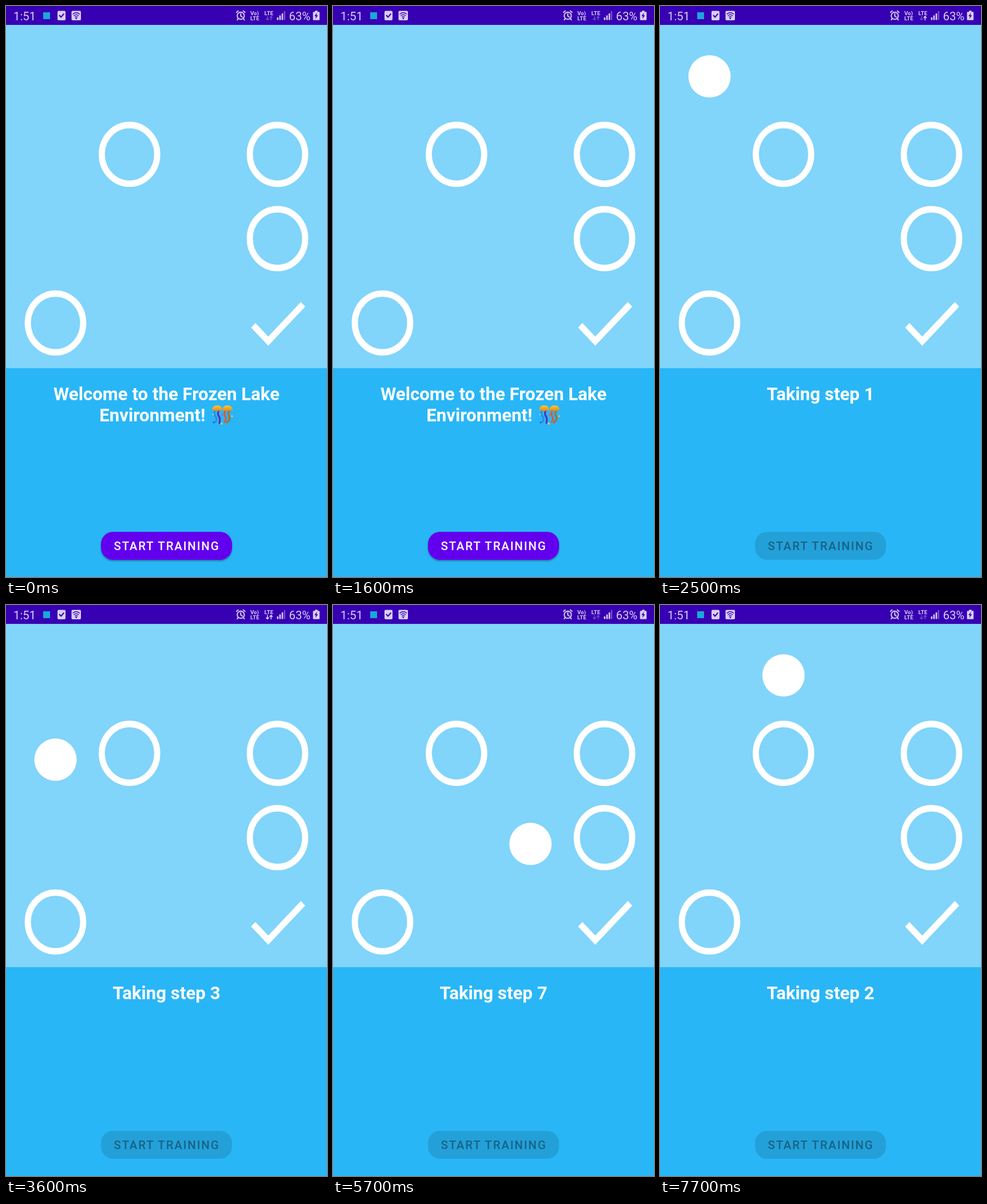
An HTML page that plays this animation: 561x998 px, repeating every 8000 ms.

```html
<!DOCTYPE html>
<html lang="en">
<head>
<meta charset="utf-8">
<title>Frozen Lake</title>
<style>
  html, body { margin: 0; width: 100%; height: 100%; overflow: hidden; background: #29b6f6; }
  svg { display: block; font-family: Roboto, sans-serif; }
  .title { font-size: 31.2px; font-weight: 700; fill: #fff; }
  .label { font-size: 20.5px; font-weight: 500; letter-spacing: .0893em; fill: #fff; }
  .status { fill: #d8cff1; font-size: 20.3px; }
  .tiny { font-size: 9.6px; font-weight: 700; }
  .off .face { fill: #000; fill-opacity: .12; filter: none; }
  .off .label { fill: #000; fill-opacity: .38; }
  .line { fill: none; stroke-linecap: round; stroke-linejoin: round; }
</style>
</head>
<body>
<svg width="561" height="998" viewBox="0 0 561 998">
  <defs>
    <filter id="shadow" x="-10%" y="-30%" width="120%" height="170%">
      <feDropShadow dx="0" dy="2" stdDeviation="1.6" flood-opacity=".35"/>
    </filter>
    <clipPath id="pill"><rect x="166" y="919" width="229" height="49" rx="21"/></clipPath>
    <radialGradient id="skin" cx=".45" cy=".35" r=".65">
      <stop offset=".3" stop-color="#ffd95a"/><stop offset="1" stop-color="#eda31f"/>
    </radialGradient>
    <linearGradient id="gold" x2="0" y2="1">
      <stop stop-color="#ffc73a"/><stop offset="1" stop-color="#d98a1b"/>
    </linearGradient>
  </defs>

  <rect width="561" height="633" fill="#81d4fa"/>
  <rect y="633" width="561" height="365" fill="#29b6f6"/>

  <!-- status bar -->
  <rect width="561" height="33" fill="#3700b3"/>
  <g class="status">
    <text x="13" y="24.5">1:51</text>
    <rect x="65" y="11" width="12" height="12" fill="#1da6dc"/>
    <rect x="90" y="8.5" width="14" height="16.5" rx="2"/>
    <path class="line" d="M93.5 16.5l2.6 3 4.8-5.5" stroke="#3700b3" stroke-width="2"/>
    <rect x="114.5" y="8.5" width="16.5" height="16.5" rx="2"/>
    <g class="line" stroke="#3700b3" stroke-width="1.4">
      <path d="M117 14q5.8-4.6 11.6 0M118.9 16.7q3.9-3 7.8 0M120.8 19.3q2-1.5 4 0"/>
    </g>
    <circle cx="122.8" cy="21.8" r="1.4" fill="#3700b3"/>
    <g class="line" stroke="#d8cff1" stroke-width="2">
      <circle cx="410.3" cy="17" r="6.2"/>
      <path d="M410.3 13.5v4l2.7 1.8M402.8 11.2l3-2.6M417.8 11.2l-3-2.6M405.5 22.5l-1.3 1.6M415.1 22.5l1.3 1.6"/>
    </g>
    <g class="tiny">
      <text x="427" y="15.5">Vo)</text>
      <text x="427" y="25">LTE</text>
      <text x="451.5" y="15.5">LTE</text>
    </g>
    <g class="line" stroke="#e6e0f6" stroke-width="1.5">
      <path id="down" d="M457 18v6.5m-2.2-2.3l2.2 2.3 2.2-2.3"/>
      <path id="up" d="M463.3 24.5v-6.5m-2.2 2.3l2.2-2.3 2.2 2.3"/>
    </g>
    <path d="M473.5 20h2.6v4.5h-2.6zM477.6 16.5h2.6v8h-2.6zM481.7 13h2.6v11.5h-2.6z"/>
    <path d="M485.6 9h2.4v15.5h-2.4z" opacity=".4"/>
    <text x="494.5" y="24.5">63%</text>
    <path d="M540 8.3h4.5v2h2.5q1 0 1 1v12.5q0 1-1 1h-9.5q-1 0-1-1v-12.5q0-1 1-1h2.5z"/>
    <path d="M543.6 11.5l-4.6 6.2h2.8l-1.4 5 5-6.5h-2.9z" fill="#3700b3"/>
  </g>

  <g id="lake" fill="none" stroke="#fff" stroke-width="2"></g>
  <circle id="agent" r="37" fill="#fff"/>

  <!-- messages -->
  <g id="welcome">
    <text class="title" x="280.5" y="689" text-anchor="middle">Welcome to the Frozen Lake</text>
    <text class="title" x="163.2" y="726">Environment!</text>
    <g class="line" stroke-width="3">
      <path d="M366 706q-4 6 0 11t0 10" stroke="#2c8be0"/>
      <path d="M372 706q-3 7 0 11t1 12" stroke="#5a2bb5"/>
      <path d="M384 706q-4 6-1 11t-1 10" stroke="#e4572a"/>
      <path d="M391 706q-4 6-1 11t-4 11" stroke="#b8672c"/>
    </g>
    <path d="M360 706q1-8 9-8t9 8q-9 4-18 0zM378 706q1-8 9-8t9 8q-9 4-18 0z" fill="url(#gold)"/>
    <g fill="#ffce3d">
      <circle cx="377" cy="730" r="1.7"/><circle cx="395" cy="717" r="1.4"/>
      <circle cx="362" cy="714" r="1.3" fill="#8de2ff"/><circle cx="378" cy="715" r="1.4" fill="#e8467c"/>
      <circle cx="363" cy="728" r="1.4" fill="#4a38c8"/><circle cx="393" cy="726" r="1.4" fill="#38a9d6"/>
    </g>
  </g>
  <text id="step" class="title" x="280.5" y="689" text-anchor="middle"></text>
  <g id="ended">
    <text class="title" x="115.8" y="689">Episode Terminated</text>
    <circle cx="427.3" cy="678.3" r="17" fill="url(#skin)"/>
    <g class="line" stroke="#6b4310" stroke-width="1.6">
      <path d="M416.5 677q3.5 3 7 0M431 677q3.5 3 7 0M422 686q5.3 4 10.6 0"/>
      <path d="M416 671q2.5-3 6-3M432.6 668q3.5 0 6 3" stroke-width="1.2"/>
    </g>
  </g>

  <g id="button">
    <rect class="face" x="166" y="919" width="229" height="49" rx="21" fill="#6200ee" filter="url(#shadow)"/>
    <circle id="ripple" cx="280" cy="944" fill="#fff" fill-opacity=".24" clip-path="url(#pill)"/>
    <text class="label" x="281" y="951.3" text-anchor="middle">START TRAINING</text>
  </g>

  <g id="touch">
    <circle r="18" fill="#bfe8ff" fill-opacity=".25"/>
    <circle r="14.5" fill="#d5effc" fill-opacity=".75" stroke="#6cc4ee" stroke-width="1"/>
  </g>
</svg>
<script>
const $ = id => document.getElementById(id);
const show = (id, on) => $(id).style.display = on ? '' : 'none';
const cellX = col => 86.5 + 129.33 * col;
const cellY = row => 112 + 147.3 * row;

// 24-unit icons stretched to a grid cell
const icon = (col, row, shape) =>
  `<g transform="translate(${cellX(col)} ${cellY(row)}) scale(5.38 5.7) translate(-12 -12)">${shape}</g>`;
const hole = '<circle cx="12" cy="12" r="9"/>';
const goal = '<path d="M9 16.17 4.83 12l-1.42 1.41L9 19 21 7l-1.41-1.41z" fill="#fff" stroke="none"/>';
$('lake').innerHTML = [[1, 1], [3, 1], [3, 2], [0, 3]].map(([c, r]) => icon(c, r, hole)).join('') + icon(3, 3, goal);

// start time, step number (0 = episode over), column, row
const steps = [
  [2400, 1, 0, 0], [3200, 2, 0, 0], [3600, 3, 0, 1], [4100, 4, 0, 2], [4600, 5, 0, 2],
  [5200, 6, 1, 2], [5700, 7, 2, 2], [6200, 0, 3, 2], [7200, 1, 0, 0], [7700, 2, 1, 0]
];

function drawTouch(t) {
  const drag = t >= 800 && t < 1600, tap = t >= 2100 && t < 2400;
  show('touch', drag || tap);
  const p = Math.min(1, Math.max(0, (t - 800) / 700));
  const k = p * p * (3 - 2 * p);
  const [x, y] = tap ? [280, 944] : [159 + 121 * k, 727 + 200 * k];
  $('touch').setAttribute('transform', `translate(${x} ${y})`);
  $('ripple').setAttribute('r', tap ? 40 + (t - 2100) * .4 : 0);
}

function draw(t) {
  const now = steps.findLast(s => s[0] <= t);
  show('welcome', !now);
  show('agent', now);
  show('step', now && now[1]);
  show('ended', now && !now[1]);
  $('button').setAttribute('class', now ? 'off' : '');
  if (now) {
    const [, n, col, row] = now;
    $('step').textContent = 'Taking step ' + n;
    $('agent').setAttribute('cx', cellX(col));
    $('agent').setAttribute('cy', cellY(row) + 11);
  }
  const busy = t >= 6400 && t < 7400;
  $('down').style.opacity = busy || t >= 3400 && t < 4400 ? 1 : .35;
  $('up').style.opacity = busy || t >= 2400 && t < 4400 ? 1 : .35;
  drawTouch(t);
}

const start = performance.now();
function tick() {
  const t = (performance.now() - start) % 8000;
  draw(Math.floor(t / 100) * 100);
  requestAnimationFrame(tick);
}
tick();
</script>
</body>
</html>
```
